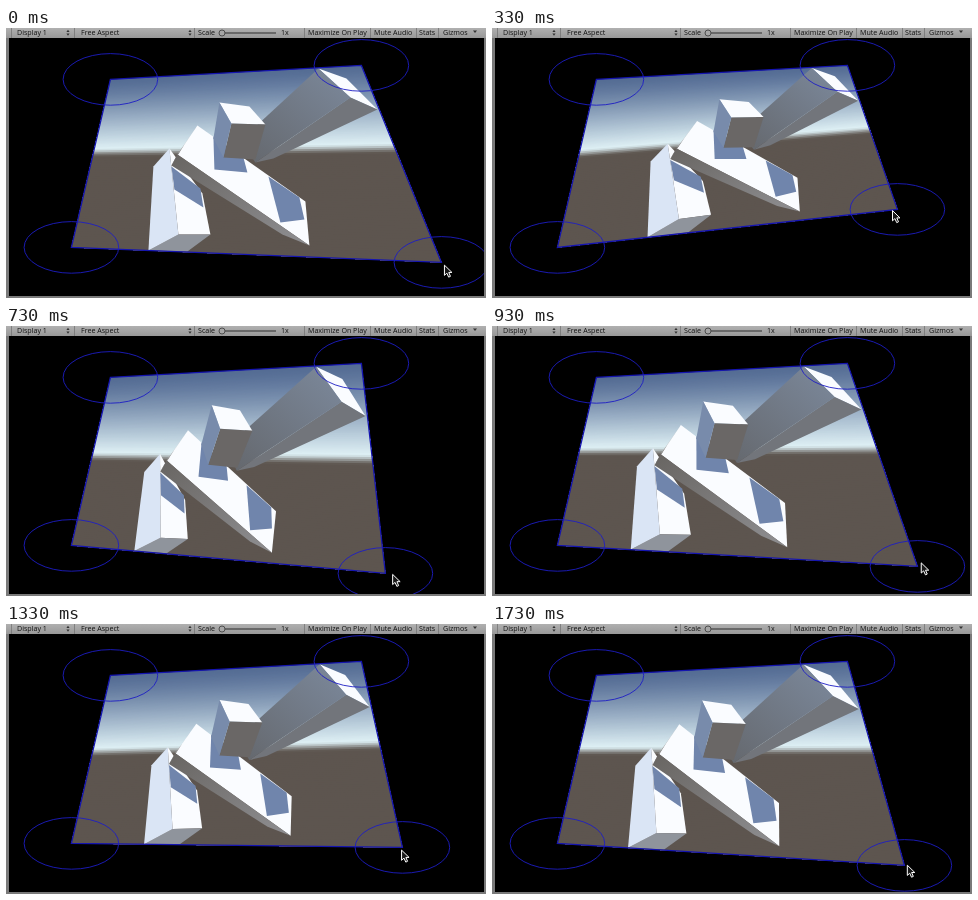
An HTML page that plays this animation: 480 px wide and 270 px high, repeating every 1790 ms.

```html
<!DOCTYPE html>
<html>
<head>
<meta charset="utf-8">
<style>
  html, body { margin: 0; width: 100%; height: 100%; overflow: hidden; background: #000; }
  svg { display: block; width: 480px; height: 270px; }
  text { font: 7.1px "Open Sans", "Noto Sans", sans-serif; fill: #111; }
</style>
</head>
<body>
<svg id="stage" viewBox="0 0 480 270">
  <defs>
    <linearGradient id="bar" x2="0" y2="1">
      <stop stop-color="#b0b0b0"/><stop offset="1" stop-color="#989898"/>
    </linearGradient>
    <linearGradient id="beamSide" y1="1" y2="0">
      <stop stop-color="#64676c"/><stop offset="1" stop-color="#7c899c"/>
    </linearGradient>
    <linearGradient id="slabSide" y2="1">
      <stop stop-color="#686562"/><stop offset="1" stop-color="#8f8f92"/>
    </linearGradient>
    <clipPath id="view"><rect x="3" y="11" width="475" height="257"/></clipPath>
  </defs>
  <rect width="480" height="270" fill="#7a7a7a"/>
  <rect x="3" y="10" width="475" height="258"/>
  <g id="toolbar"><rect width="480" height="10" fill="url(#bar)"/></g>
  <g clip-path="url(#view)">
    <g transform="translate(.4 .4)">
      <g id="scene"></g>
      <polygon id="frame" fill="none" stroke="#1414b0" stroke-width="1.3"/>
      <g id="handles" fill="none" stroke="#1e1ec4" stroke-width=".9"></g>
    </g>
  </g>
  <path id="cursor" d="M0 0V10.2L2.4 8L4.2 12L6 11.2L4.3 7.3H7.5Z" fill="#181818" stroke="#fff" stroke-width="1"/>
</svg>
<script>
const byId = id => document.getElementById(id);

function add(parent, tag, attrs, text) {
  const el = document.createElementNS('http://www.w3.org/2000/svg', tag);
  for (const name in attrs) el.setAttribute(name, attrs[name]);
  if (text) el.textContent = text;
  return parent.appendChild(el);
}

// Toolbar: each label follows its cell border
const toolbar = byId('toolbar');
function label(text, x, border) {
  add(toolbar, 'text', { x, y: 7.2 }, text);
  if (border) add(toolbar, 'path', { d: `M${border}.5 0V10`, stroke: '#757575', 'stroke-width': .8 });
}
function popupArrows(x) {
  add(toolbar, 'path', { d: `M${x - 1.6} 4L${x} 1.7L${x + 1.6} 4ZM${x - 1.6} 5.4L${x} 7.7L${x + 1.6} 5.4Z`, fill: '#333' });
}
label('Display 1', 11, 5);
popupArrows(62);
label('Free Aspect', 75, 68);
popupArrows(184);
label('Scale', 192, 188);
label('1x', 275);
label('Maximize On Play', 302, 298);
label('Mute Audio', 368, 364);
label('Stats', 413, 410);
label('Gizmos', 437, 432);
add(toolbar, 'path', { d: 'M467 2.5H471L469 5Z', fill: '#333' });
add(toolbar, 'path', { d: 'M213 5H270', stroke: '#555', 'stroke-width': 1.3 });
add(toolbar, 'circle', { cx: 216, cy: 5, r: 3, fill: '#a6a6a6', stroke: '#444', 'stroke-width': .9 });

// Projective map from the unit square to a quad (clockwise from top left)
function projection([[x0, y0], [x1, y1], [x2, y2], [x3, y3]]) {
  const ax = x1 - x2, ay = y1 - y2, bx = x3 - x2, by = y3 - y2;
  const sx = x0 - x1 + x2 - x3, sy = y0 - y1 + y2 - y3;
  const det = ax * by - bx * ay;
  const g = (sx * by - bx * sy) / det, h = (ax * sy - sx * ay) / det;
  const a = x1 - x0 + g * x1, b = x3 - x0 + h * x3;
  const d = y1 - y0 + g * y1, e = y3 - y0 + h * y3;
  return {
    project([u, v]) {
      const w = 1 + g * u + h * v;
      return [(x0 + a * u + b * v) / w, (y0 + d * u + e * v) / w];
    },
    unproject([x, y]) {
      const p = a - x * g, q = b - x * h, r = d - y * g, s = e - y * h;
      const k = p * s - q * r;
      return [((x - x0) * s - q * (y - y0)) / k, (p * (y - y0) - r * (x - x0)) / k];
    }
  };
}

const quad = corner => [[104, 51], [355, 37], corner, [65, 219]];
const rest = projection(quad([435, 234]));
const scene = byId('scene');
const shapes = [];

function shape(fill, points) {
  shapes.push({ el: add(scene, 'polygon', { fill }), points });
}

// Backdrop: sky brightens to the horizon, then drops into the ground
const ZENITH = [84, 108, 148], HAZE = [220, 238, 243], GROUND = [93, 85, 79];
const HORIZON = .49, BLUR = .055, STRIPS = 100;
const clamp = x => Math.min(1, Math.max(0, x));
const mix = (from, to, k) => from.map((c, i) => c + (to[i] - c) * k);

for (let i = 0; i < STRIPS; i++) {
  const v = i / STRIPS;
  const above = mix(ZENITH, HAZE, clamp(v / HORIZON) ** 1.35);
  const fade = clamp((v - HORIZON) / BLUR);
  const color = mix(above, GROUND, fade * fade * (3 - 2 * fade));
  shape(`rgb(${color.map(Math.round)})`, [[0, v], [1, v], [1, 1], [0, 1]]);
}

// Blocks are measured with the dragged corner at rest.
const face = (fill, ...points) => shape(fill, points.map(rest.unproject));

// Three faces around the nearest vertex, bounded by a ring of six
function block(fills, hub, ...ring) {
  fills.forEach((fill, i) =>
    face(fill, hub, ring[2 * i], ring[2 * i + 1], ring[(2 * i + 2) % 6]));
}

const LIT = '#fafcff', SHADOW = '#7085ac', DIM = '#6a6766';
// far beam
block([LIT, '#72757b', 'url(#beamSide)'], [344, 69],
  [312, 40], [340, 50], [371, 81], [267, 130], [249, 134], [234, 112]);
// near block
block([LIT, '#8f949c', '#dae5f5'], [172, 206],
  [163, 120], [196, 165], [204, 206], [181, 223], [142, 222], [147, 138]);
face(SHADOW, [165, 138], [194, 160], [197, 179], [168, 161]);
// slab
block([LIT, 'url(#slabSide)', DIM], [171, 126],
  [191, 97], [299, 173], [303, 217], [276, 206], [165, 137], [178, 116]);
face(SHADOW, [207, 108], [237, 129], [241, 144], [208, 141]);
face(SHADOW, [262, 148], [293, 169], [298, 191], [274, 194]);
// cube
block([LIT, DIM, '#788bab'], [225, 95],
  [213, 74], [243, 78], [259, 96], [249, 131], [217, 129], [207, 110]);

const frame = byId('frame');
const handles = quad([0, 0]).map(() => add(byId('handles'), 'ellipse', { rx: 47.3, ry: 25.8 }));

// The dragged corner circles twice through these points: [step, x, y]
const drag = [[0, 435, 234], [1, 438, 236], [3, 426, 198], [5, 405, 181], [7, 383, 196], [9, 372, 223],
  [11, 379, 247], [14, 425, 240], [16, 425, 224], [20, 396, 223], [23, 396, 247], [26, 412, 241], [27, 416, 241]];

// Smooth curve through the drag points
function corner(step) {
  const i = Math.max(1, drag.findIndex(key => key[0] > step));
  const from = drag[i - 1], to = drag[i];
  const before = drag[i - 2] || from, after = drag[i + 1] || to;
  const span = to[0] - from[0], t = (step - from[0]) / span;
  return [1, 2].map(c => {
    const leave = span * (to[c] - before[c]) / (to[0] - before[0]);
    const arrive = span * (after[c] - from[c]) / (after[0] - from[0]);
    return from[c] * (1 + 2 * t) * (1 - t) ** 2 + to[c] * t * t * (3 - 2 * t) +
      leave * t * (1 - t) ** 2 - arrive * t * t * (1 - t);
  });
}

const format = points => points.map(p => p.map(n => n.toFixed(2)).join()).join(' ');

function render(ms) {
  // Steps of 70, 60 and 70 ms
  const part = ms % 200;
  const step = 3 * Math.floor(ms / 200) + (part >= 70) + (part >= 130);
  const corners = quad(corner(step));
  const { project } = projection(corners);
  for (const { el, points } of shapes) el.setAttribute('points', format(points.map(project)));
  frame.setAttribute('points', format(corners));
  handles.forEach((el, i) => {
    el.setAttribute('cx', corners[i][0]);
    el.setAttribute('cy', corners[i][1]);
  });
  // The pointer runs slightly ahead of the corner it drags
  const [x, y] = corner(step + .5);
  byId('cursor').setAttribute('transform', `translate(${x + 1.2} ${y + .4})`);
}

const LOOP = 1790;
const start = performance.now();
function tick() {
  render((performance.now() - start) % LOOP);
  requestAnimationFrame(tick);
}
tick();
</script>
</body>
</html>
```
